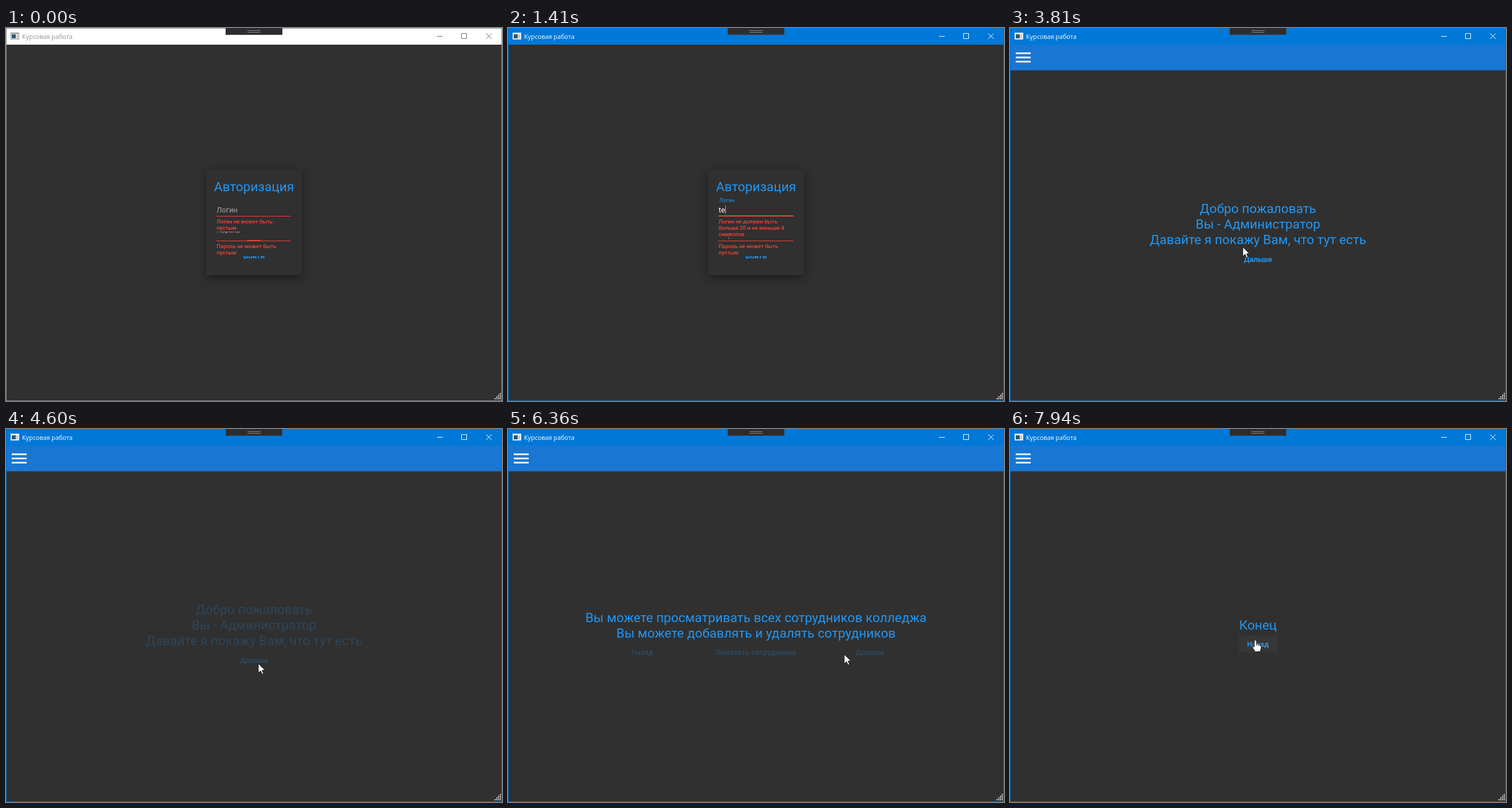
Animation of 863 by 649 pixels, one loop 8000 ms. Source, as an HTML page with a canvas:

```html
<!DOCTYPE html>
<html lang="ru">
<head>
<meta charset="utf-8">
<style>
html, body { margin: 0; width: 100%; height: 100%; overflow: hidden; background: #303030; }
canvas { display: block; }
</style>
</head>
<body>
<canvas id="stage" width="863" height="649"></canvas>
<script>
const ctx = document.getElementById('stage').getContext('2d');
const LOOP = 8000, MID = 431.5;
const BG = '#303030', BLUE = '#2196f3', RED = '#f44336', GREY = '#a6a6a6';
const HEAD = 22.6, BODY = 12.8, SMALL = 9.5;
const LOGIN = 'test';

const ACTIVATE = 800, TAB = 1820, SUBMIT = 2930, ENTER = 3350, FADE = 205;
const LOGIN_KEYS = [1030, 1410, 1540, 1640];
const PASS_KEYS = [2030, 2110, 2210, 2300];
const CLICKS = [4440, 5600, 6360, 7230];

const trio = (pitch, middle) => ['Назад', middle, 'Дальше'].map((label, i) =>
  ({ label, x: MID + (i - 1) * pitch, w: pitch - 10 }));

const PAGES = [
  { lines: ['Добро пожаловать', 'Вы - Администратор', 'Давайте я покажу Вам, что тут есть'],
    base: 322, row: 402, buttons: [{ label: 'Дальше', x: MID, w: 79 }] },
  { lines: ['Вы можете просматривать все группы колледжа', 'Вы можете добавлять и удалять группы колледжа'],
    base: 336, row: 388, buttons: trio(179.5, 'Показать группы') },
  { lines: ['Вы можете просматривать всех сотрудников колледжа', 'Вы можете добавлять и удалять сотрудников'],
    base: 336, row: 388, buttons: trio(198, 'Показать сотрудников') },
  { lines: ['Вы можете просматривать всех студентов колледжа', 'Вы можете добавлять и удалять студентов'],
    base: 336, row: 388, buttons: trio(188, 'Показать студентов') },
  { lines: ['Конец'], base: 349, row: 374, buttons: [{ label: 'Назад', x: MID, w: 68 }] }
];

// Pointer route: time, x, y
const ROUTE = [
  [30, 866, 470], [770, 449, 313], [2710, 449, 313], [2860, 363, 372], [3080, 405, 388],
  [3800, 405, 388], [3810, 405, 381], [3960, 444, 414], [4140, 444, 414], [4190, 439, 408],
  [4850, 439, 408], [5240, 554, 398], [5290, 558, 390], [5390, 558, 390], [5560, 585, 392],
  [7560, 585, 392], [7930, 427, 367]
];

const ramp = (t, from, to) => Math.min(1, Math.max(0, (t - from) / (to - from)));
const smooth = p => p * p * (3 - 2 * p);
const mix = (a, b, p) => a + (b - a) * p;
const count = (keys, t) => keys.filter(k => t >= k).length;

function box(x, y, w, h, color) {
  ctx.fillStyle = color;
  ctx.fillRect(x, y, w, h);
}

function text(str, x, y, size, color, align = 'left', weight = 400, family = 'Roboto') {
  ctx.font = `${weight} ${size}px "${family}", sans-serif`;
  ctx.textAlign = align;
  ctx.fillStyle = color;
  ctx.fillText(str, x, y);
}

function pointerAt(t) {
  let i = ROUTE.findIndex(k => k[0] > t);
  if (i < 0) return ROUTE[ROUTE.length - 1].slice(1);
  if (i === 0) return [-50, -50];
  const [a, b] = [ROUTE[i - 1], ROUTE[i]], p = smooth(ramp(t, a[0], b[0]));
  return [Math.round(mix(a[1], b[1], p)), Math.round(mix(a[2], b[2], p))];
}

const inside = ([x, y], cx, cy, w, h) => Math.abs(x - cx) <= w / 2 && Math.abs(y - cy) <= h / 2;

function button(b, y, pointer, enabled = true) {
  const hover = enabled && inside(pointer, b.x, y, b.w, 30);
  if (hover) {
    ctx.fillStyle = '#363636';
    ctx.beginPath();
    ctx.roundRect(Math.round(b.x - b.w / 2), y - 15, b.w, 30, 2);
    ctx.fill();
  }
  ctx.globalAlpha = enabled ? 1 : 0.23;
  text(b.label, b.x, y + 4.5, 13, BLUE, 'center', 600);
  ctx.globalAlpha = 1;
  return hover;
}

function windowFrame(active) {
  const bar = active ? '#0078d7' : '#ffffff', ink = active ? '#ffffff' : '#6b6b6b';
  box(0, 0, 863, 649, active ? '#0078d7' : '#8c8c8c');
  box(1, 1, 861, 28, bar);
  box(1, 29, 861, 619, BG);

  box(8, 8, 15, 12, active ? '#dfe9f1' : '#8f9499');
  box(9, 10, 13, 9, '#f4f4f4');
  box(10, 11, 7, 7, '#35586b');
  box(18, 11, 3, 7, '#c3c8cc');
  text('Курсовая работа', 28, 19, 10.8, active ? '#fff' : '#8f8f8f', 'left', 400, 'Open Sans');

  box(382, 0, 99, 12, '#3f3f46');
  box(383, 0, 97, 11, '#2d2d30');
  for (const y of [4, 7]) box(420, y, 23, 1, '#8a8a8a');

  ctx.strokeStyle = ink;
  ctx.lineWidth = 1;
  ctx.beginPath();
  ctx.moveTo(750, 14.5); ctx.lineTo(760, 14.5);
  ctx.rect(792.5, 9.5, 9, 9);
  ctx.moveTo(835.5, 9.5); ctx.lineTo(845, 19);
  ctx.moveTo(845, 9.5); ctx.lineTo(835.5, 19);
  ctx.stroke();
}

function sizeGrip() {
  for (let r = 0; r < 4; r++)
    for (let c = 3 - r; c < 4; c++) box(850 + c * 3, 635 + r * 3, 2, 2, '#d5d5d5');
}

function label(str, y, lift, color) {
  text(str, mix(366.5, 367.5, lift), mix(y + 4.5, y - 13.5, lift), mix(BODY, SMALL, lift), color);
}

function underline(y, focus, color) {
  box(366, y, 130, 1, color);
  if (focus > 0) box(MID - 65 * focus, y - 1, 130 * focus, 2, color);
}

function errorNote(y, name, typed) {
  const lines = typed
    ? [name + ' не должен быть', 'больше 20 и не меньше 4', 'символов']
    : [name + ' не может быть', 'пустым'];
  box(366, y + 14, 131, lines.length > 2 ? 35 : 24, BG);
  lines.forEach((s, i) => text(s, 366.5, y + 23.5 + i * 11.4, SMALL, RED, 'left', 500));
}

function authPage(t, pointer) {
  ctx.save();
  ctx.shadowColor = 'rgba(0,0,0,.42)';
  ctx.shadowBlur = 17;
  ctx.shadowOffsetY = 5;
  ctx.fillStyle = BG;
  ctx.beginPath();
  ctx.roundRect(348, 247, 167, 183, 3);
  ctx.fill();
  ctx.restore();

  const chars = count(LOGIN_KEYS, t), dots = count(PASS_KEYS, t);
  const inLogin = t >= ACTIVATE && t < TAB, inPass = t >= TAB && t < SUBMIT;
  const loginFocus = smooth(ramp(t, ACTIVATE + 20, 1020) * (1 - ramp(t, TAB, TAB + 180)));
  const passFocus = t < ACTIVATE ? 0.2 * (1 - ramp(t, 0, 30))
    : smooth(ramp(t, TAB, TAB + 180) * (1 - ramp(t, SUBMIT, SUBMIT + 180)));
  const loginLift = smooth(ramp(t, ACTIVATE + 20, 1030));
  const passLift = t < ACTIVATE ? 0.4 * (1 - ramp(t, 0, 120)) : smooth(ramp(t, TAB, TAB + 190));

  text('Авторизация', MID, 284, HEAD, BLUE, 'center');
  const hover = button({ label: 'Войти', x: MID, w: 69 }, 396, pointer);

  label('Пароль', 359, passLift, inPass ? BLUE : GREY);
  label('Логин', 316, loginLift, inLogin ? BLUE : GREY);
  if (chars < 4) errorNote(316, 'Логин', chars);
  if (dots < 4) errorNote(359, 'Пароль', dots);
  underline(327, loginFocus, chars < 4 ? RED : BLUE);
  underline(370, passFocus, dots < 4 ? RED : BLUE);

  const typed = LOGIN.slice(0, chars);
  text(typed, 366.5, 320.5, BODY, '#fff');
  if (inLogin) box(Math.round(367 + ctx.measureText(typed).width), 309, 1, 14, '#bbb');
  ctx.fillStyle = '#fff';
  for (let i = 0; i < dots; i++) {
    ctx.beginPath();
    ctx.arc(371.2 + i * 7.3, 360.5, 3, 0, 7);
    ctx.fill();
  }
  if (inPass) box(Math.round(367 + dots * 7.45), 353, 1, 14, '#bbb');

  if (hover) return 'hand';
  return inside(pointer, MID, 317, 130, 22) || inside(pointer, MID, 360, 130, 22) ? 'beam' : 'arrow';
}

function tourPage(t, pointer) {
  box(1, 29, 861, 44.6, '#1976d2');
  for (const i of [-1, 0, 1]) box(10, 49.8 + i * 7.3, 26, 2.9, '#f2f6fa');

  const n = count(CLICKS, t), since = n ? t - CLICKS[n - 1] : Infinity;
  const leaving = since < FADE;
  const page = PAGES[leaving ? n - 1 : n];
  ctx.globalAlpha = !n ? ramp(t, ENTER - 40, ENTER + 180)
    : leaving ? 1 - since / FADE : ramp(since, FADE, 2 * FADE);
  page.lines.forEach((s, i) => text(s, MID, page.base + i * 27, HEAD, BLUE, 'center'));
  ctx.globalAlpha = 1;

  const enabled = n ? since >= 2 * FADE : t >= ENTER + 180;
  const hovers = page.buttons.map(b => button(b, page.row, pointer, enabled));
  return hovers.includes(true) ? 'hand' : 'arrow';
}

const SHAPES = {
  arrow: new Path2D('M0 0V16.5L4 12.8L6.6 18.6L9.2 17.5L6.7 11.8H11.8Z'),
  hand: new Path2D('M-2 1.5Q0-1 2 1.5V7Q4 5.8 5.2 7.6Q7 6.8 7.8 8.6Q10 8.2 10 11V15L8 20.5H-.5L-5 13.5Q-5 10.4-2 12.4Z'),
  beam: new Path2D('M-3 -7.5H-1L.5 -6.5L2 -7.5H4M.5 -6.5V6.5M-3 7.5H-1L.5 6.5L2 7.5H4')
};

function drawPointer([x, y], kind) {
  ctx.save();
  ctx.translate(x, y);
  ctx.lineWidth = 1;
  ctx.lineJoin = 'round';
  if (kind === 'beam') {
    ctx.strokeStyle = '#fff';
  } else {
    ctx.fillStyle = '#fff';
    ctx.fill(SHAPES[kind]);
    ctx.strokeStyle = '#111';
  }
  ctx.stroke(SHAPES[kind]);
  if (kind === 'hand') ctx.stroke(new Path2D('M2 7V10M5.2 7.6V10.5M7.8 8.6V11'));
  ctx.restore();
}

function render(t) {
  const pointer = pointerAt(t);
  windowFrame(t >= ACTIVATE);
  const kind = t < ENTER ? authPage(t, pointer) : tourPage(t, pointer);
  sizeGrip();
  const typing = t >= LOGIN_KEYS[0] && t < 2350;
  if (!typing) drawPointer(pointer, kind);
}

function tick() {
  render(performance.now() % LOOP);
  requestAnimationFrame(tick);
}
tick();
</script>
</body>
</html>
```
